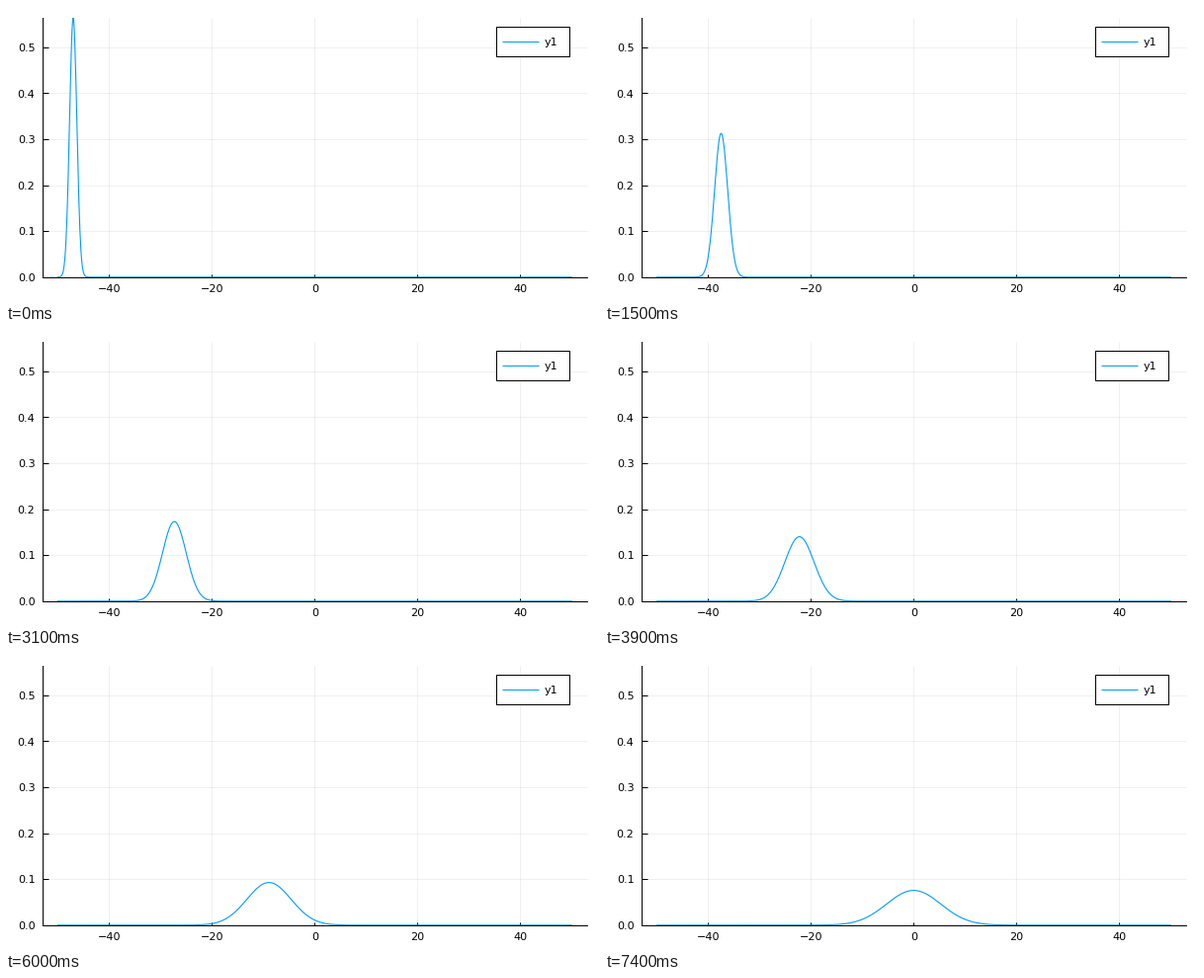
A matplotlib script for the animation above (7500 ms loop, 600x300 px).

```python
import numpy as np
import matplotlib.pyplot as plt
from matplotlib.animation import FuncAnimation
from matplotlib.patches import Rectangle
from matplotlib.transforms import Affine2D

W, H, DPI = 600, 300, 100
FRAMES, INTERVAL = 75, 100
DT = 0.1                      # simulated time per frame
START, SPEED = -47.0, 6.35    # packet centre and group velocity
PEAK = 1 / np.sqrt(np.pi)
LEFT, RIGHT, TOP, BOTTOM = 36.8, 587.9, 12.0, 274.8
BLUE = "#009AFA"
PX = 72 / DPI                 # one pixel in points

plt.rcParams["font.family"] = "DejaVu Sans"
plt.rcParams["font.size"] = 8

fig = plt.figure(figsize=(W / DPI, H / DPI), dpi=DPI, facecolor="white")
ax = fig.add_axes([LEFT / W, 1 - BOTTOM / H,
                   (RIGHT - LEFT) / W, (BOTTOM - TOP) / H])
ax.set_xlim(-53, 53)
ax.set_ylim(0, PEAK)
ax.set_xticks([])
ax.set_yticks([])
for side in ("top", "right"):
    ax.spines[side].set_visible(False)
for side in ("left", "bottom"):
    ax.spines[side].set_linewidth(PX)

# Pixel coordinates with the origin at the top left
pixels = Affine2D().scale(1 / W, -1 / H).translate(0, 1) + fig.transFigure


def segment(xs, ys, color="black", width=1.0, **kw):
    ax.plot(xs, ys, color=color, lw=width * PX, transform=pixels,
            clip_on=False, solid_capstyle="butt", **kw)


def label(x, y, text, ha):
    ax.text(x, y, text, transform=pixels, ha=ha, va="baseline", color="black")


def x_pixel(v):
    return LEFT + (v + 53) / 106 * (RIGHT - LEFT)


def y_pixel(v):
    return BOTTOM - v / PEAK * (BOTTOM - TOP)


for v in range(-40, 41, 20):
    px = x_pixel(v)
    segment([px, px], [TOP, BOTTOM], alpha=0.06, zorder=1)
    segment([px, px], [BOTTOM - 3.2, BOTTOM], zorder=2)
    label(px, 290, str(v).replace("-", "\u2212"), "center")

for i in range(6):
    py = y_pixel(i / 10)
    if i:
        segment([LEFT, RIGHT], [py, py], alpha=0.06, zorder=1)
    segment([LEFT, LEFT + 6.6], [py, py], zorder=2)
    label(29.5, py + 4.1, f"{i / 10:.1f}", "right")

ax.add_patch(Rectangle((495.6, 20.6), 74, 30, transform=pixels, fc="white",
                       ec="black", lw=PX, clip_on=False, zorder=4))
segment([502, 538.5], [35.7, 35.7], BLUE, zorder=5)
ax.text(544.5, 40, "y1", transform=pixels, va="baseline", zorder=5)

x = np.linspace(-50, 50, 1001)
curve, = ax.plot(x, np.zeros_like(x), color=BLUE, lw=1.1 * PX, zorder=3)


def density(t):
    """Probability density of a freely spreading Gaussian wave packet."""
    spread = 1 + t * t
    return PEAK / np.sqrt(spread) * np.exp(-(x - START - SPEED * t) ** 2 / spread)


def update(n):
    curve.set_ydata(density(n * DT))
    return curve,


anim = FuncAnimation(fig, update, frames=FRAMES, interval=INTERVAL,
                     repeat=True, repeat_delay=0, blit=False)
plt.show()
```
